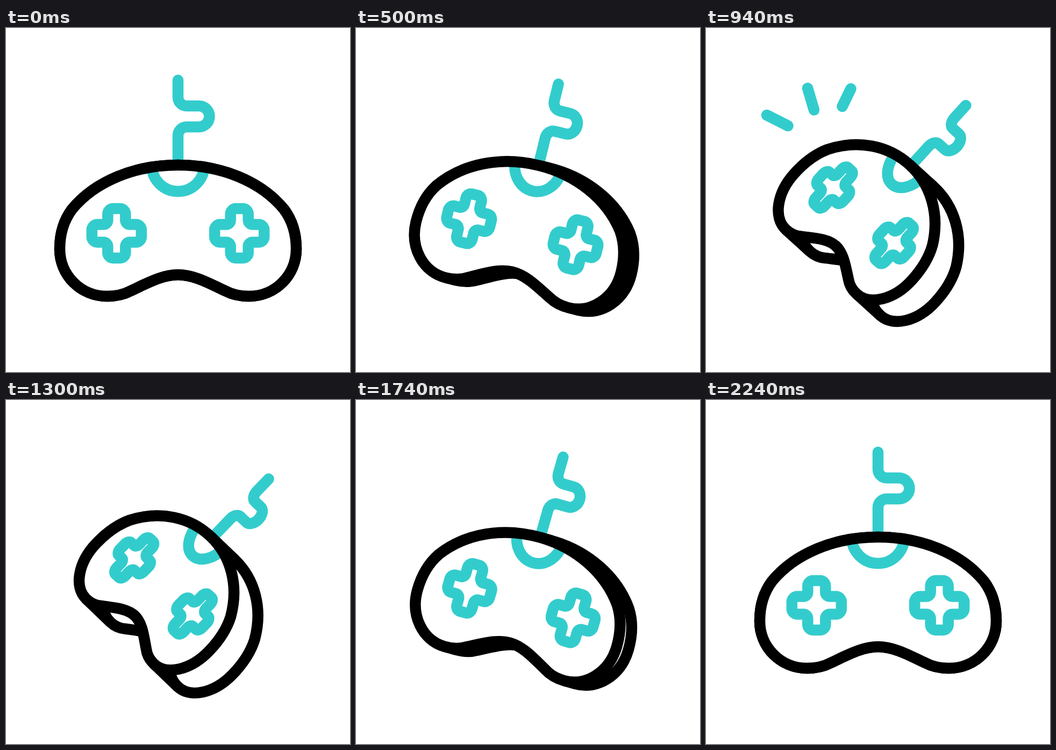
Write an HTML page that moves like this. It is 640x640 px and loops after 2.4 s.

```html
<!DOCTYPE html>
<html lang="en">
<head>
<meta charset="utf-8">
<title>Game controller</title>
<style>
  /* --p: how far the controller is turned, 0 = facing front */
  @property --p { syntax: "<number>"; inherits: true; initial-value: 0; }

  html, body { margin: 0; width: 100%; height: 100%; overflow: hidden; background: #fff; }

  svg {
    display: block;
    width: 640px;
    height: 640px;
    fill: none;
    stroke: #33cccc;
    stroke-width: 20.5px;
    stroke-linejoin: round;
    --squeeze: calc(1 - .35 * var(--p));
    animation: turn 2400ms infinite;
  }
  path { vector-effect: non-scaling-stroke; }

  .rig {
    transform:
      translate(calc(320px + var(--p) * (7.9px * var(--p) * var(--p) * var(--p) - 35px)),
                calc(382px + var(--p) * (2.5px - 40.7px * var(--p))))
      rotate(calc(45deg * var(--p)));
  }
  .face { transform: scaleX(var(--squeeze)); }
  .back { transform: translateX(calc(63.4px * var(--p))) scaleX(var(--squeeze)); }
  .edge { transform: translateX(calc(var(--x) * var(--squeeze))) scaleX(var(--p)); }
  .cord { transform: translate(calc(-1.7px * var(--p)), calc(6.8px * var(--p))); }

  .black { stroke: #000; }
  .white { fill: #fff; }
  .round { stroke-linecap: round; }

  .sparks path {
    stroke-dasharray: 1 2;
    stroke-dashoffset: 1.01;
    animation: spark 2400ms infinite;
  }

  @keyframes turn {
    0%, .83% { --p: 0; animation-timing-function: cubic-bezier(.654, 0, .244, 1); }
    50.6% { --p: .98; animation-timing-function: cubic-bezier(.667, 0, .333, 1); }
    90.6%, 100% { --p: 0; }
  }
  @keyframes spark {
    0%, 30.8% { stroke-dashoffset: 1.01; animation-timing-function: ease-in-out; }
    37.5%, 39.4% { stroke-dashoffset: 0; animation-timing-function: ease-in-out; }
    44.8%, 100% { stroke-dashoffset: -1.01; }
  }
</style>
</head>
<body>
<svg viewBox="0 0 640 640">
  <defs>
    <path id="body" d="M0-127C-80-127-154-97-197-45C-212-25-220 1-220 29C-220 78-181 117-132 117C-116 117-101 114-88 107C-58 93-30 77 0 77C30 77 58 93 88 107C101 114 116 117 132 117C181 117 220 78 220 29C220 1 212-25 197-45C154-97 80-127 0-127Z"/>
    <path id="pad" d="M-6.5-46h13a10 10 0 0 1 10 10v11.5a8 8 0 0 0 8 8h11.5a10 10 0 0 1 10 10v13a10 10 0 0 1-10 10h-11.5a8 8 0 0 0-8 8v11.5a10 10 0 0 1-10 10h-13a10 10 0 0 1-10-10v-11.5a8 8 0 0 0-8-8h-11.5a10 10 0 0 1-10-10v-13a10 10 0 0 1 10-10h11.5a8 8 0 0 0 8-8v-11.5a10 10 0 0 1 10-10z"/>
  </defs>

  <g class="cord">
    <g class="rig">
      <g class="face round">
        <path d="M0-285v32a16 16 0 0 0 16 16h23a19.5 19.5 0 0 1 0 39h-23a16 16 0 0 0-16 16v50"/>
      </g>
    </g>
  </g>

  <g class="rig">
    <g class="black">
      <g class="back white"><use href="#body"/></g>
      <path class="edge" style="--x: 0px" d="M0-127h63.4"/>
      <path class="edge" style="--x: -132px" d="M0 117h63.4"/>
      <path class="edge" style="--x: 132px" d="M0 117h63.4"/>
    </g>
    <g class="face">
      <use href="#body" class="white" stroke="none"/>
      <path d="M-49-127a49 49 0 0 0 98 0"/>
      <use href="#pad" x="-114.2"/>
      <use href="#pad" x="114.2"/>
      <use href="#body" class="black"/>
    </g>
  </g>

  <g class="sparks round">
    <path pathLength="1" d="M152.5 182L113 162"/>
    <path pathLength="1" d="M201 152.5L189 112"/>
    <path pathLength="1" d="M253.5 146L269.5 113"/>
  </g>
</svg>
</body>
</html>
```
